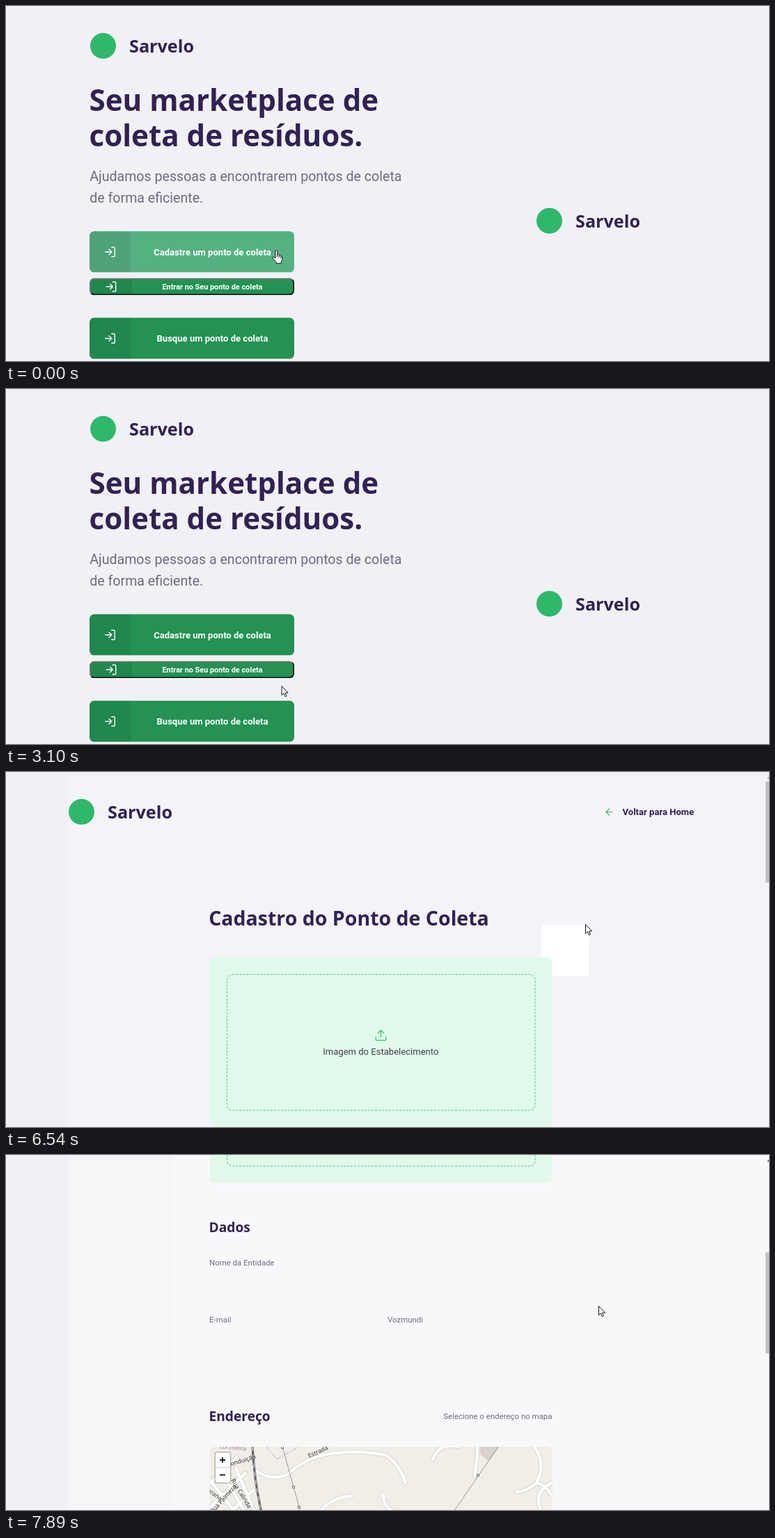
An HTML page with a canvas for the animation above (8 s loop, 1096 px wide and 511 px high).

```html
<!DOCTYPE html>
<html lang="pt-BR">
<head>
<meta charset="utf-8">
<title>Pontos de coleta</title>
<style>
html, body { margin: 0; width: 100%; height: 100%; overflow: hidden; background: #f0f0f5; }
canvas { display: block; width: 1096px; height: 511px; }
</style>
</head>
<body>
<canvas id="stage" width="1096" height="511"></canvas>
<script>
const ctx = document.getElementById('stage').getContext('2d');
const LOOP = 8000;
const FORM_OPENS = 4890;
const SCROLL_STARTS = 6980;
const HEAD = '"Noto Sans", sans-serif';
const BODY = 'Roboto, sans-serif';
const BRAND = 'Sarvelo';
const INK = '#322153';
const GREY = '#6c6c80';
const SHADE = 'rgba(0,0,0,.08)';

const ICONS = {
  enter: new Path2D('M15 3h4a2 2 0 0 1 2 2v14a2 2 0 0 1-2 2h-4M10 17l5-5-5-5M15 12H3'),
  upload: new Path2D('M21 15v4a2 2 0 0 1-2 2H5a2 2 0 0 1-2-2v-4M17 8l-5-5-5 5M12 3v12'),
  back: new Path2D('M19 12H5M12 19l-7-7 7-7')
};
const ARROW = new Path2D('M.5.5V13.6L3.4 10.9 5.4 15.6 7.4 14.7 5.4 10.1H9.6Z');
const HAND = new Path2D('M5 12V1.8a1.4 1.4 0 0 1 2.8 0V7q2.4-.8 2.6.7 2.2-.6 2.4.9 1.9-.2 1.9 1.6v4.3l-1.6 3v1.9H6.2v-1.6L1.2 12.2q-.6-1.8 1-2Z');

// Pointer moves: start, end, number of jumps, target, sideways swing
const MOVES = [
  { from: 890, to: 1160, jumps: 3, x: 369, y: 411, swing: 0 },
  { from: 1730, to: 2340, jumps: 5, x: 375, y: 462, swing: 0 },
  { from: 2800, to: 3990, jumps: 9, x: 379.5, y: 357.5, swing: 22 },
  { from: 5940, to: 6540, jumps: 5, x: 832, y: 219, swing: 0 },
  { from: SCROLL_STARTS, to: SCROLL_STARTS, jumps: 1, x: 851, y: 217, swing: 0 }
];

// Progress 0..1 in equal jumps, the first at `from`, the last at `to`
function jumped(t, { from, to, jumps }) {
  if (t < from) return 0;
  if (t >= to) return 1;
  return (1 + Math.floor((t - from) / (to - from) * (jumps - 1) + 0.03)) / jumps;
}

function pointerAt(t) {
  let x = 388, y = 351;
  for (const m of MOVES) {
    const p = jumped(t, m);
    x += (m.x - x) * p + m.swing * Math.sin(Math.PI * p);
    y += (m.y - y) * p;
  }
  return [x, y];
}

function scrollAt(t) {
  return 471 * jumped(t, { from: SCROLL_STARTS, to: 7890, jumps: 7 }) ** 1.566;
}

function rect(x, y, w, h, color) {
  ctx.fillStyle = color;
  ctx.fillRect(x, y, w, h);
}

function roundPath(x, y, w, h, r) {
  ctx.beginPath();
  ctx.roundRect(x, y, w, h, r);
}

function round(x, y, w, h, r, color) {
  roundPath(x, y, w, h, r);
  ctx.fillStyle = color;
  ctx.fill();
}

function stroke(color, width = 1, dash = []) {
  ctx.setLineDash(dash);
  ctx.strokeStyle = color;
  ctx.lineWidth = width;
  ctx.stroke();
  ctx.setLineDash([]);
}

function disc(x, y, r, color) {
  ctx.beginPath();
  ctx.arc(x, y, r, 0, 7);
  ctx.fillStyle = color;
  ctx.fill();
}

function text(str, x, y, size, font, color, weight = 400, align = 'left') {
  ctx.font = `${weight} ${size}px ${font}`;
  ctx.textAlign = align;
  ctx.fillStyle = color;
  ctx.fillText(str, x, y);
}

const title = (str, x, y, size) => text(str, x, y, size, HEAD, INK, 700);
const label = (str, x, y, align) => text(str, x, y, 11.45, BODY, GREY, 400, align);

function icon(name, cx, cy, scale, color) {
  ctx.save();
  ctx.translate(cx, cy);
  ctx.scale(scale, scale);
  ctx.translate(-12, -12);
  ctx.strokeStyle = color;
  ctx.lineWidth = 1.8;
  ctx.lineCap = ctx.lineJoin = 'round';
  ctx.stroke(ICONS[name]);
  ctx.restore();
}

function logo(x, y) {
  disc(x + 19.5, y, 18.5, '#2fb86b');
  title(BRAND, x + 57, y + 9.7, 25.2);
}

function pointer(x, y, kind) {
  const hand = kind === 'hand';
  const shape = hand ? HAND : ARROW;
  ctx.save();
  ctx.translate(hand ? x - 6 : x, y);
  ctx.fillStyle = '#fff';
  ctx.fill(shape);
  ctx.strokeStyle = '#15151c';
  ctx.lineWidth = 1;
  ctx.lineJoin = 'round';
  ctx.stroke(shape);
  if (hand) {
    ctx.beginPath();
    for (let i = 0; i < 3; i++) {
      ctx.moveTo(7.8 + 2.5 * i, 7 + i);
      ctx.lineTo(7.8 + 2.5 * i, 10 + i);
    }
    ctx.stroke();
  }
  if (kind === 'busy') {
    ctx.beginPath();
    ctx.arc(11.2, -0.3, 4.7, 0, 7);
    stroke('#2492dc', 3);
  }
  ctx.restore();
}

const fillOf = hot => hot ? '#55b182' : '#239253';

function bigButton(y, str, hot) {
  round(120, y, 294, 59, 6.5, fillOf(hot));
  round(120, y, 59, 59, [6.5, 0, 0, 6.5], SHADE);
  icon('enter', 149.5, y + 29.7, 0.75, '#fff');
  text(str, 296.5, y + 34.2, 13.07, BODY, '#fff', 700, 'center');
}

// Outset border: grey above and left, black below and right
function smallButton(y, str, hot) {
  const x = 120, w = 294, h = 24.3, edge = 1.6;
  round(x, y, w, h, 6.5, '#6f7672');
  ctx.save();
  ctx.beginPath();
  ctx.moveTo(x, y + h);
  ctx.lineTo(x + 6, y + h - 6);
  ctx.lineTo(x + w - 6, y + 6);
  ctx.lineTo(x + w, y);
  ctx.lineTo(x + w, y + h);
  ctx.clip();
  round(x, y, w, h, 6.5, '#0b0f0d');
  ctx.restore();
  round(x + edge, y + edge, w - 2 * edge, h - 2 * edge, 5, fillOf(hot));
  round(x + edge, y + edge, 59, h - 2 * edge, [5, 0, 0, 5], SHADE);
  icon('enter', 151, y + 12.2, 0.75, '#fff');
  text(str, 296.5, y + 16.4, 10.89, BODY, '#fff', 700, 'center');
}

function drawHome(t) {
  const [x, y] = pointerAt(t);
  const over = (top, height) => y >= top && y < top + height;
  const [first, second, third] = [over(324, 59), over(392, 24), over(449, 59)];
  const busy = second && t >= 1160 && t < 1290;

  logo(120, 57.3);
  logo(761, 309.2);
  title('Seu marketplace de', 119.5, 150.6, 42.1);
  title('coleta de resíduos.', 119.5, 201.6, 42.1);
  text('Ajudamos pessoas a encontrarem pontos de coleta', 120.2, 252, 19.6, BODY, GREY);
  text('de forma eficiente.', 120.2, 283, 19.6, BODY, GREY);
  bigButton(324.3, 'Cadastre um ponto de coleta', first);
  smallButton(391.8, 'Entrar no Seu ponto de coleta', second);
  bigButton(448.8, 'Busque um ponto de coleta', third);
  pointer(x, y, busy ? 'busy' : first || third ? 'hand' : 'arrow');
}

// A bow from a to b, bulging sideways
function bow(path, x0, y0, x1, y1, bulge = 0) {
  const [dx, dy] = [x1 - x0, y1 - y0];
  const k = bulge * 2 / Math.hypot(dx, dy);
  path.moveTo(x0, y0);
  path.quadraticCurveTo((x0 + x1) / 2 - dy * k, (y0 + y1) / 2 + dx * k, x1, y1);
}

function mapRoads() {
  const roads = new Path2D();
  bow(roads, 353, 28, 404, 40, 9);
  bow(roads, 404, 40, 450, 13, -3);
  bow(roads, 450, 13, 546, 12, -5);
  bow(roads, 546, 12, 574, 52, -4);
  bow(roads, 613, 18, 650, 0, -9);
  bow(roads, 673, 42, 677, 0, 1);
  bow(roads, 759, 0, 762, 52, -8);
  bow(roads, 762, 52, 733, 65, -3);
  bow(roads, 762, 52, 785, 73, -4);
  bow(roads, 784, 52, 768, 91, 10);
  bow(roads, 453, 91, 496, 71, -5);
  bow(roads, 542, 71, 553, 91, 3);
  for (let i = 0; i < 3; i++) {
    bow(roads, 292 + 19 * i, 47 - 8 * i, 330 + 14 * i, 95);
    bow(roads, 286, 60 + 34 * i, 332 + 12 * i, 14 + 24 * i);
  }
  return roads;
}

const ROADS = mapRoads();

function line(x0, y0, x1, y1, color, width, dash) {
  ctx.beginPath();
  bow(ctx, x0, y0, x1, y1);
  stroke(color, width, dash);
}

function pylon(x, y) {
  rect(x - 2, y - 2, 4, 4, '#777');
  rect(x - 1, y - 1, 2, 2, '#f0eee7');
}

function street(str, x, y, deg, color = '#333') {
  ctx.save();
  ctx.translate(x, y);
  ctx.rotate(deg * Math.PI / 180);
  text(str, 0, 3, 8.6, HEAD, color, 400, 'center');
  ctx.restore();
}

function zoomControl() {
  round(299.5, 7, 24, 46, 4, 'rgba(0,0,0,.24)');
  round(301, 8.5, 21, 43, 2, '#fff');
  rect(301, 29.5, 21, 1, '#ccc');
  rect(307, 18.2, 8, 1.8, '#111');
  rect(310.1, 15.1, 1.8, 8, '#111');
  rect(307, 39.6, 8, 1.8, '#111');
}

function drawMap(top) {
  ctx.save();
  ctx.translate(0, top);
  roundPath(292.5, 0, 492, 245, 8);
  ctx.clip();
  rect(292, 0, 493, 245, '#f0eee7');
  ctx.fillStyle = '#d9d3cc';
  ctx.fill(new Path2D('M681 0h28l-15 21-13-10z'));
  rect(331, 84, 7, 5, '#cdeccb');

  ctx.lineCap = 'round';
  ctx.strokeStyle = '#d0cfcb';
  ctx.lineWidth = 6;
  ctx.stroke(ROADS);
  ctx.strokeStyle = '#fff';
  ctx.lineWidth = 4.4;
  ctx.stroke(ROADS);
  disc(542, 71, 3, '#fff');
  ctx.lineCap = 'butt';

  line(374, 0, 389, 18, '#c7a3c6', 1, [7, 2, 2, 2]);
  line(389, 18, 421, 0, '#c7a3c6', 1, [7, 2, 2, 2]);
  line(397, 0, 424, 97, '#999');
  line(707, 0, 644, 92, '#999');
  pylon(397, 1);
  pylon(413, 58);
  pylon(421, 87);
  pylon(678, 41);
  ctx.beginPath();
  bow(ctx, 354, 0, 367, 95, 2);
  stroke('#666', 3.2);
  stroke('#ccc', 1.4, [6, 6]);

  street('Lorimeira', 326, 1, 5, '#a777a6');
  street('Conduição', 338, 20, -17);
  street('Estrada', 448, 7, -24);
  street('Rua Calinda', 338, 67, 59);
  street('Rua Palmeza', 312, 75, -49);
  street('Serana', 298, 67, 35);
  zoomControl();
  ctx.restore();
}

// The page brightens in patches as it loads
function drawBackdrop(t) {
  const scrolling = t >= SCROLL_STARTS;
  rect(89, 6, 1007, 505, scrolling ? '#f6f6f9' : '#f3f3f8');
  if (scrolling) rect(89, 0, 1007, 6, '#f3f3f7');
  else if (t >= 6540) rect(769, 220, 68, 74, '#fff');
  if (t >= 7430) rect(240, 0, 856, 511, '#f8f8fb');
}

function uploadPanel() {
  round(292.5, 266.5, 492, 245, 8, '#e1f9eb');
  roundPath(317.5, 291.5, 442.5, 195.5, 8);
  stroke('#55c182', 1, [3, 2]);
  icon('upload', 538.5, 379, 0.8167, '#4ecb79');
  text('Imagem do Estabelecimento', 538.3, 407.2, 13.07, BODY, '#403f4b', 400, 'center');
}

function drawScrollbar(scroll) {
  rect(1091, 13.5 + scroll * 0.269, 5, 145.5, '#c1c1c1');
  ctx.fillStyle = scroll ? '#505050' : '#999';
  ctx.fill(new Path2D('M1093 9.5l3-3v3z'));
}

function drawForm(t) {
  const scroll = scrollAt(t);
  drawBackdrop(t);
  ctx.save();
  if (t < 5030) ctx.globalAlpha = 0.6;
  ctx.translate(0, -Math.round(scroll));
  logo(89, 57.3);
  icon('back', 866.5, 57.5, 0.65, '#34a96c');
  text('Voltar para Home', 885.5, 62.3, 13.07, BODY, INK, 700);
  title('Cadastro do Ponto de Coleta', 291.2, 220.5, 28.5);
  uploadPanel();
  title('Dados', 291.5, 582, 19.2);
  label('Nome da Entidade', 292, 630.3);
  label('E-mail', 292, 712.3);
  label('Vozmundi', 548, 712.3);
  title('Endereço', 291.5, 854, 19.2);
  label('Selecione o endereço no mapa', 784.5, 851.3, 'right');
  drawMap(891);
  ctx.restore();
  drawScrollbar(scroll);
  pointer(...pointerAt(t), 'arrow');
}

let start;
function tick(now) {
  start ??= now;
  const t = (now - start) % LOOP;
  rect(0, 0, 1096, 511, '#f0f0f5');
  if (t < FORM_OPENS) drawHome(t);
  else drawForm(t);
  requestAnimationFrame(tick);
}
requestAnimationFrame(tick);
</script>
</body>
</html>
```
